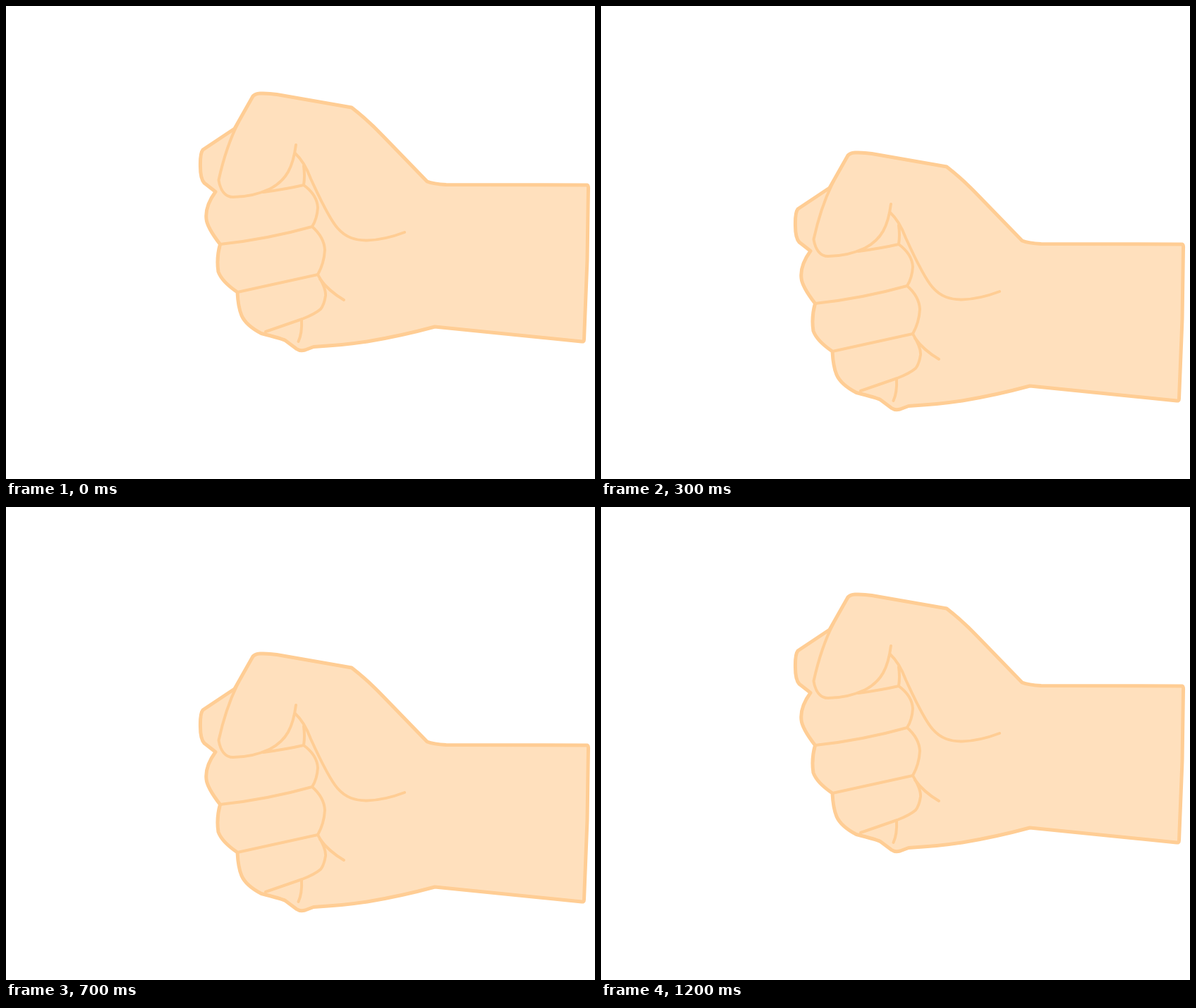
These frames come from a looping animation (835 by 671 pixels, 1.3 s). An HTML page:

```html
<!DOCTYPE html>
<html lang="en">
<head>
<meta charset="utf-8">
<title>Shaking fist</title>
<style>
  html, body { margin: 0; width: 100%; height: 100%; overflow: hidden; background: #fff; }
  svg { display: block; width: 100%; height: 100%; }
  path { stroke: #ffcd94; stroke-linecap: round; stroke-linejoin: round; }
  .outline { fill: #ffe0bd; stroke-width: 5; }
  .crease { fill: none; stroke-width: 4; }
</style>
</head>
<body>
<svg viewBox="0 0 835 671">
  <g id="fist">
    <path class="outline" d="M350 128 Q353 124.500 360 124 Q372 123.500 384 125.500 L490 144
      Q512 161 535 185 L597 249 Q606 252.500 624 253.500 L824 254 Q826 255 825.500 260
      L824 360 L819.500 473 Q819.500 476.500 816 476 L608 455 Q560 468 512 476
      Q480 481 436 483.500 L424 488 Q417 490 412 486.500 L396 474.500 Q390 471.500 362 464.500
      Q340 453 334 439 Q329 427 328 406 Q306 391 301 377 Q298 358 303.500 338
      Q285 314 284 302 Q282 284 297 263.500 L281 251 Q275.500 245 275.500 228
      Q275 209 279 204 L324 174 Z"/>
    <!-- thumb -->
    <path class="crease" d="M330 164 Q312 199 301.500 247 C304 262 311 271 322 271
      C340 271 360 266 374 259.500 C398 247 407 228 411 197"/>
    <!-- fingers -->
    <path class="crease" d="M365 264 Q398 259.500 422 254 Q424 241 422 227"/>
    <path class="crease" d="M422 254 Q441 268 442 286 Q441 302 434 313 Q370 331 303.500 338"/>
    <path class="crease" d="M434 313 Q451 328 452 346 Q451 365 442 381 L328 406"/>
    <path class="crease" d="M442 381 Q454 401 453 411 Q451 424 446 430 Q438 437 420 444 L368 462"/>
    <!-- palm -->
    <path class="crease" d="M410 209 Q423 221 432 245 C448 280 461 305 470 315
      C482 329 496 332.500 512 332.500 C530 332 548 327.500 565 321"/>
    <path class="crease" d="M445 387 Q457 404 479 417"/>
    <path class="crease" d="M419 445 Q420 464 414.500 476"/>
  </g>
</svg>
<script>
  const LOOP = 1300, STEP = 100;
  const DROPS = [0, 84, 167, 84];
  const fist = document.getElementById("fist");
  const start = performance.now();

  function draw(ms) {
    const step = Math.floor((ms % LOOP) / STEP);
    fist.setAttribute("transform", `translate(0 ${DROPS[step % DROPS.length]})`);
  }

  function tick() {
    draw(performance.now() - start);
    requestAnimationFrame(tick);
  }
  tick();
</script>
</body>
</html>
```
